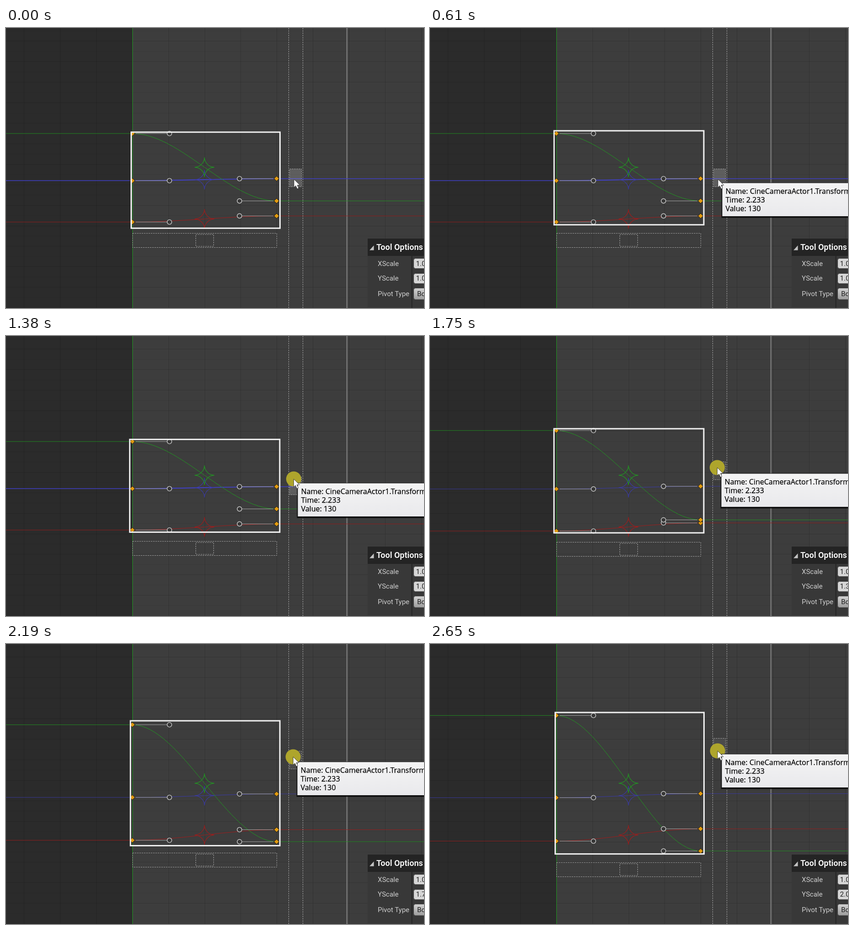
An HTML page that plays this animation: 913x613 px, repeating every 2750 ms.

```html
<!DOCTYPE html>
<html lang="en">
<head>
<meta charset="utf-8">
<title>Curve scaling</title>
<style>
  html, body { margin: 0; width: 100%; height: 100%; overflow: hidden; background: #3d3d3d; }
  svg { display: block; width: 913px; height: 613px; }
  path, rect, circle { fill: none; }
  .green { stroke: #209a20; }
  .blue { stroke: #3a3aa8; }
  .blue.hot { stroke: #4040c6; }
  .red { stroke: #a01c1c; }
  .dash { stroke: #a4a4a4; stroke-dasharray: 3 2; }
  .tangent { stroke: #a6a6a6; }
  .knob { stroke: #bdbdbd; stroke-width: 1.6; fill: #363636; }
  .key { fill: #e09a10; stroke: #1c1812; }
  .panel text { font: 15px Roboto, sans-serif; fill: #cfcfcf; }
  .panel .title { font-size: 18px; font-weight: 700; fill: #f2f2f2; }
  .panel .shadow { fill: #0c0c0c; }
  .panel .value { fill: #1c1c1c; }
  .field { stroke: #4a4a4a; fill: #d6d6d6; }
  .tip text { font: 16px "Open Sans", "Noto Sans", sans-serif; fill: #000; stroke: #000; stroke-width: .25; }
</style>
</head>
<body>
<svg viewBox="0 0 913 613">
  <defs>
    <linearGradient id="button" x2="0" y2="1">
      <stop stop-color="#d2d2d2"/><stop offset="1" stop-color="#9c9c9c"/>
    </linearGradient>
    <linearGradient id="card" x2="0" y2="1">
      <stop stop-color="#f4f4f4"/><stop offset="1" stop-color="#e9e9ec"/>
    </linearGradient>
  </defs>
  <rect width="913" height="613" style="fill:#3d3d3d"/>
  <rect width="276" height="613" style="fill:#2b2b2b"/>
  <g id="grid" stroke="#000"></g>
  <path d="M744.5 0V613" stroke="#808080" stroke-width="2"/>
  <path d="M746.5 0V613" stroke="#505050"/>
  <path class="green" d="M276.5 0V613"/>
  <g id="curves"></g>
  <g id="stars"></g>
  <path class="dash" d="M617.5 0V613M648.5 0V613"/>
  <g id="wide">
    <rect class="dash" x="276.5" width="315" height="31"/>
    <rect class="dash" x="414.5" y="2.5" width="39" height="26"/>
  </g>
  <rect id="grip" class="dash" x="619.5" width="26" height="39"/>
  <g id="keys"></g>
  <rect id="frame" stroke="#f0f0f0" stroke-width="3"/>

  <g class="panel">
    <rect x="790" y="461" width="123" height="152" style="fill:#383838"/>
    <rect x="790" y="461" width="123" height="38" style="fill:#242424"/>
    <path d="M886.5 461V613" stroke="#242424" stroke-width="2"/>
    <path d="M794 486.5H803.5V476Z" style="fill:#c4c4c4"/>
    <text class="title shadow" x="810" y="487">Tool Options</text>
    <text class="title" x="809" y="485.5">Tool Options</text>
    <text x="812" y="520.5">XScale</text>
    <text x="812" y="553">YScale</text>
    <text x="812" y="586.5">Pivot Type</text>
    <rect class="field" x="890.5" y="504.5" width="60" height="22" rx="4"/>
    <rect class="field" x="890.5" y="537.5" width="60" height="22" rx="4"/>
    <rect class="field" x="890.5" y="569.5" width="60" height="25" rx="4" style="fill:url(#button)"/>
    <text class="value" x="895.5" y="520.5">1.0</text>
    <text class="value" id="yScale" x="895.5" y="553">1.0</text>
    <text class="value" x="898" y="586.5">Bounds</text>
  </g>

  <circle id="press" r="16.5" style="fill:#aea52c"/>
  <g id="tip" class="tip">
    <rect x="-1" y="1" width="320" height="76" style="fill:#050505;opacity:.85"/>
    <rect x=".5" y=".5" width="320" height="73.5" stroke="#1c1c1c" style="fill:url(#card)"/>
    <text x="8" y="24">Name: CineCameraActor1.Transform</text>
    <text x="8" y="43">Time: 2.233</text>
    <text x="8" y="62">Value: 130</text>
  </g>
  <path id="cursor" d="M0 0V17.5L4 14L7 21L10.2 19.6L7.2 12.8H12.8Z"
    stroke="#222" stroke-width=".8" style="fill:#fff"/>
</svg>
<script>
const LOOP = 2750, LAST = 30, X0 = 276, X1 = 591, TANGENT = 81;
const byId = id => document.getElementById(id);
const clamp = v => Math.min(1, Math.max(0, v));

// Screen updates slow down evenly: update n starts at 72n + 0.52n² ms.
const updateAt = t => Math.min(LAST, Math.floor((Math.sqrt(72 * 72 + 2.08 * t) - 72) / 1.04));

// Key points: update, value
const scaleKeys = [[17, 1], [21, 1.325], [23, 1.65], [27, 1.82], [30, 2.01]];
const cursorKeys = [[14, 331.2], [16, 315], [17, 313], [20, 297], [21, 288], [23, 259], [26, 241], [28, 234]];
const padKeys = [[0, 3], [8, 6], [21, 4], [23, 9.5], [30, 6.5]];

function sample(keys, n) {
  const i = keys.findIndex(k => k[0] > n);
  if (i <= 0) return keys.at(i)[1];
  const [a, from] = keys[i - 1], [b, to] = keys[i];
  return from + (to - from) * (n - a) / (b - a);
}

function set(el, attrs) {
  for (const name in attrs) el.setAttribute(name, attrs[name]);
}
function add(parent, tag, attrs) {
  const el = document.createElementNS('http://www.w3.org/2000/svg', tag);
  set(el, attrs);
  return byId(parent).appendChild(el);
}
const move = (el, x, y) => el.setAttribute('transform', `translate(${x} ${y})`);

for (let i = 0; i < 12; i++)
  add('grid', 'path', { d: `M${Math.round(39 + i * 78.9) + .5} 0V613`, opacity: .16 });
for (let i = 0; i < 28; i++)
  add('grid', 'path', { d: `M0 ${Math.round(6 + i * 22.45) + .5}H913`, opacity: i % 2 ? .14 : .07 });

// mid: pivot height, start: offset of the first key at scale 1
const curves = [
  { color: 'red', mid: 418.1, start: 6.7 },
  { color: 'blue', mid: 332, start: 2.2 },
  { color: 'green', mid: 304.8, start: -73.8 }
];
for (const c of curves) {
  c.path = add('curves', 'path', {});
  c.ends = add('curves', 'path', { opacity: .85 });
  add('stars', 'path', {
    class: c.color, transform: `translate(433.5 ${c.mid})`, 'stroke-width': 1.2,
    d: 'M0-21.5C0-10 10 0 21.5 0C10 0 0 10 0 21.5C0 10-10 0-21.5 0C-10 0 0-10 0-21.5Z'
  });
  c.parts = [[X0, 1], [X1, -1]].map(([x, dir]) => [
    add('keys', 'path', { class: 'tangent', d: `M${x + 7 * dir} 0H${x + (TANGENT - 5) * dir}` }),
    add('keys', 'circle', { class: 'knob', cx: x + TANGENT * dir, r: 5 }),
    add('keys', 'path', { class: 'key', d: `M${x - 5.5} 0l5.5-5.5l5.5 5.5l-5.5 5.5Z` })
  ]);
}

function drawCurve(c, scale) {
  const a = c.mid + c.start * scale, b = c.mid - c.start * scale, third = (X1 - X0) / 3;
  const hot = c.color === 'blue' && scale === 1;
  const look = { class: hot ? 'blue hot' : c.color, 'stroke-width': hot ? 1.8 : 1 };
  set(c.path, { ...look, d: `M${X0} ${a}C${X0 + third} ${a} ${X1 - third} ${b} ${X1} ${b}` });
  set(c.ends, { ...look, d: `M0 ${a}H${X0}M${X1} ${b}H913` });
  c.parts.forEach((part, i) => part.forEach(el => move(el, 0, i ? b : a)));
}

function draw(n) {
  const scale = sample(scaleKeys, n);
  const reach = curves.map(c => Math.abs(c.start) * scale);
  const top = Math.min(...curves.map((c, i) => c.mid - reach[i]));
  const bottom = Math.max(...curves.map((c, i) => c.mid + reach[i]));
  for (const c of curves) drawCurve(c, scale);

  move(byId('wide'), 0, Math.round(bottom + 24.5) + .5);
  set(byId('grip'), {
    y: Math.round(308 - 101 * (scale - 1)) + .5,
    style: `fill:rgba(255,255,255,${scale > 1 ? .07 : .17})`
  });
  byId('yScale').textContent = (Math.floor(scale * 10) / 10).toFixed(1);

  // The selection box hugs the keys loosely and sags at first.
  const pad = sample(padKeys, n), sway = Math.sin(Math.PI * n / LAST);
  const left = 273.5 - 3.3 * sway, sag = 10.5 * clamp(1 - n / 8);
  set(byId('frame'), {
    x: left, y: top - pad,
    width: 598.5 - .6 * sway - left, height: bottom - top + 2 * pad + sag
  });

  // The tooltip trails the pointer.
  const x = 629 - 1.9 * Math.sin(Math.PI * clamp((n - 15) / 18)), y = sample(cursorKeys, n);
  move(byId('cursor'), x, y);
  move(byId('press'), x, y);
  set(byId('press'), { visibility: n > 15 ? 'visible' : 'hidden' });
  move(byId('tip'), Math.round(x + 8) + .5, Math.round(sample(cursorKeys, n - .65) + 6.45) + .5);
  set(byId('tip'), { opacity: clamp((n - 3) / 2) });
}

const begin = performance.now();
function tick() {
  draw(updateAt((performance.now() - begin) % LOOP));
  requestAnimationFrame(tick);
}
tick();
</script>
</body>
</html>
```
